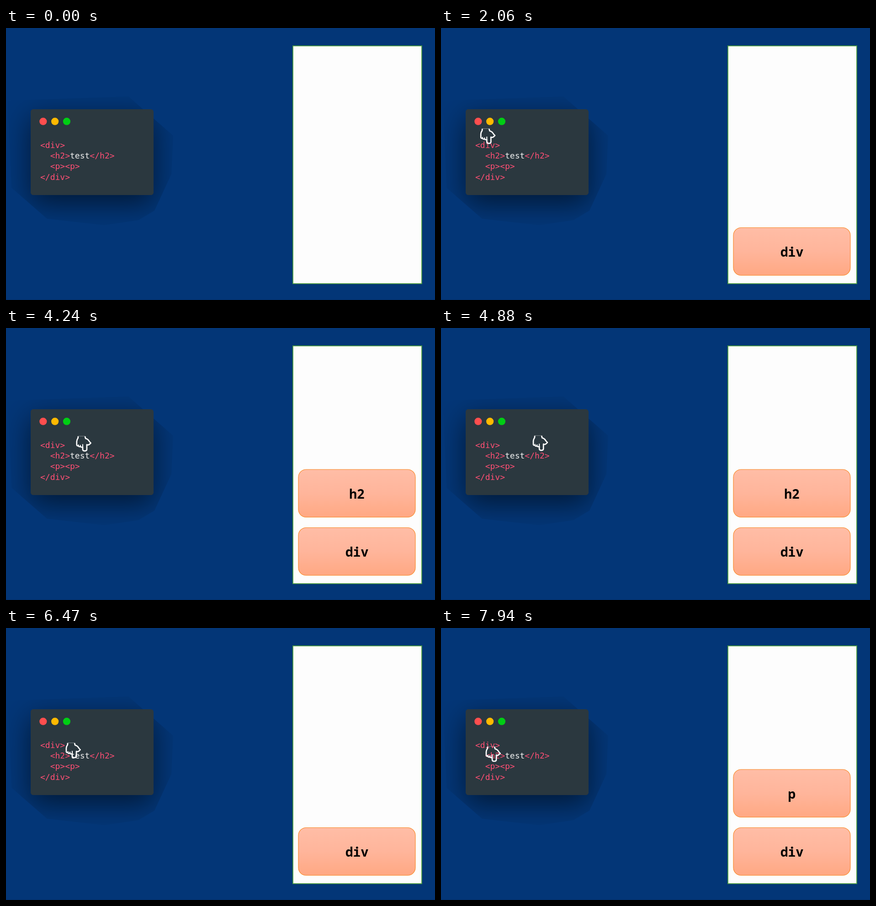
Recreate the animation shown at these times as an HTML page with a canvas. Size 939 by 596 pixels, loop 8 s.

```html
<!DOCTYPE html>
<html lang="en">
<head>
<meta charset="utf-8">
<title>Call stack</title>
<style>
  html, body { margin: 0; width: 100%; height: 100%; overflow: hidden; background: #033677; }
  canvas { display: block; }
</style>
</head>
<body>
<canvas id="stage" width="939" height="596"></canvas>
<script>
const ctx = document.getElementById('stage').getContext('2d');
const LOOP = 8000;
const TAG = '#ff4f74', PLAIN = '#f1f1f1';

// Pointer moves: start, end (ms) and the place reached
const home = [80, 210];
const moves = [
  { from: 1480, to: 2910, at: [95.8, 238] },
  { from: 3455, to: 4935, at: [201, 235.4] },
  { from: 5595, to: 7025, at: [95, 259.3] },
  { from: 7660, to: 9140, at: [121, 259.3] }
];

// Stack blocks: label, top edge and visible time span
const blocks = [
  { label: 'div', y: 437.5, from: 820, to: LOOP },
  { label: 'h2', y: 310, from: 3000, to: 4940 },
  { label: 'p', y: 310, from: 7120, to: LOOP }
];

const code = [
  [['<div>', TAG]],
  [['  <h2>', TAG], ['test', PLAIN], ['</h2>', TAG]],
  [['  <p><p>', TAG]],
  [['</div>', TAG]]
];

const outline = new Path2D(
  'M4.6 0.8 L4.4 4.5 Q1.6 8.5 1.5 12 L1.5 19.5 Q2 22.3 5.2 21.6 ' +
  'Q6.4 24.3 9.6 23.2 Q11.2 25.4 14.6 24.2 L14.6 29.5 Q14.8 32.7 19 32.7 ' +
  'Q23.4 32.7 23.6 29.5 L23.6 19 L25.6 19.6 Q28 20.2 32.3 15.4 ' +
  'Q29.8 13.4 27.6 9.8 Q25.6 6.6 20.8 5.4 L19.6 0.8');
const creases = new Path2D('M14.6 24.2 L14.6 18 M5.2 21.6 L5.2 18.6 M9.6 23 L9.6 19.6');

const ease = p => p * p * (3 - 2 * p);

function pointer(t) {
  let [x, y] = home;
  for (const m of moves) {
    if (t <= m.from) break;
    const k = ease(Math.min(1, (t - m.from) / (m.to - m.from)));
    x += (m.at[0] - x) * k;
    y += (m.at[1] - y) * k;
  }
  return [x, y];
}

function rounded(x, y, w, h, r) {
  ctx.beginPath();
  ctx.roundRect(x, y, w, h, r);
}

function polygon(...points) {
  ctx.beginPath();
  points.forEach(([x, y]) => ctx.lineTo(x, y));
  ctx.closePath();
}

function drawWindow() {
  ctx.save();
  polygon([4, 159], [268, 150], [366, 236], [362, 320], [325, 400],
          [290, 421], [215, 432], [90, 418], [12, 350]);
  ctx.clip();
  ctx.shadowColor = 'rgba(0,0,0,0.55)';
  ctx.shadowBlur = 62;
  ctx.shadowOffsetY = 19;
  ctx.fillStyle = '#2b383f';
  rounded(54, 178, 269, 188, 6);
  ctx.fill();
  ctx.restore();

  ctx.fillStyle = '#2b383f';
  rounded(54, 178, 269, 188, 6);
  ctx.fill();

  ['#ff4e4e', '#ffb900', '#00ce14'].forEach((color, i) => {
    ctx.fillStyle = color;
    ctx.beginPath();
    ctx.arc(81.3 + i * 25.8, 204.7, 8.1, 0, Math.PI * 2);
    ctx.fill();
  });

  ctx.font = '18px "DejaVu Sans Mono", monospace';
  ctx.textAlign = 'left';
  code.forEach((line, row) => {
    let x = 75;
    for (const [text, color] of line) {
      ctx.fillStyle = color;
      ctx.fillText(text, x, 262.8 + row * 23.3);
      x += ctx.measureText(text).width;
    }
  });
}

function drawPanel() {
  ctx.fillStyle = '#fdfdfd';
  ctx.fillRect(628, 39, 282, 521);
  ctx.strokeStyle = '#4c9c41';
  ctx.lineWidth = 1.8;
  ctx.strokeRect(628, 39.2, 282, 521);
}

function drawBlock({ label, y }) {
  const fill = ctx.createLinearGradient(0, y, 0, y + 104);
  fill.addColorStop(0, '#ffbda6');
  fill.addColorStop(0.5, '#ffb59b');
  fill.addColorStop(1, '#ffa883');
  rounded(640, y, 256, 104.5, 17);
  ctx.fillStyle = fill;
  ctx.fill();
  ctx.strokeStyle = '#f8851f';
  ctx.lineWidth = 1.1;
  ctx.stroke();
  ctx.fillStyle = '#000';
  ctx.font = '600 28px "Noto Sans Mono", monospace';
  ctx.textAlign = 'center';
  ctx.fillText(label, 768, y + 63.5);
}

function drawHand(x, y) {
  ctx.save();
  ctx.translate(x, y);
  ctx.strokeStyle = '#fff';
  ctx.lineJoin = 'round';
  ctx.lineWidth = 2.7;
  ctx.stroke(outline);
  ctx.lineWidth = 2;
  ctx.stroke(creases);
  ctx.fillStyle = 'rgba(255,255,255,0.5)';
  ctx.fillRect(4, 0, 16, 0.8);
  ctx.restore();
}

function draw(t) {
  ctx.fillStyle = '#033677';
  ctx.fillRect(0, 0, 939, 596);
  ctx.fillStyle = '#032f68';
  ctx.fillRect(0, 595, 939, 1);
  drawWindow();
  drawPanel();
  blocks.filter(b => t >= b.from && t < b.to).forEach(drawBlock);
  if (t >= 820) drawHand(...pointer(t));
}

const start = performance.now();
function tick() {
  draw((performance.now() - start) % LOOP);
  requestAnimationFrame(tick);
}
tick();
</script>
</body>
</html>
```
